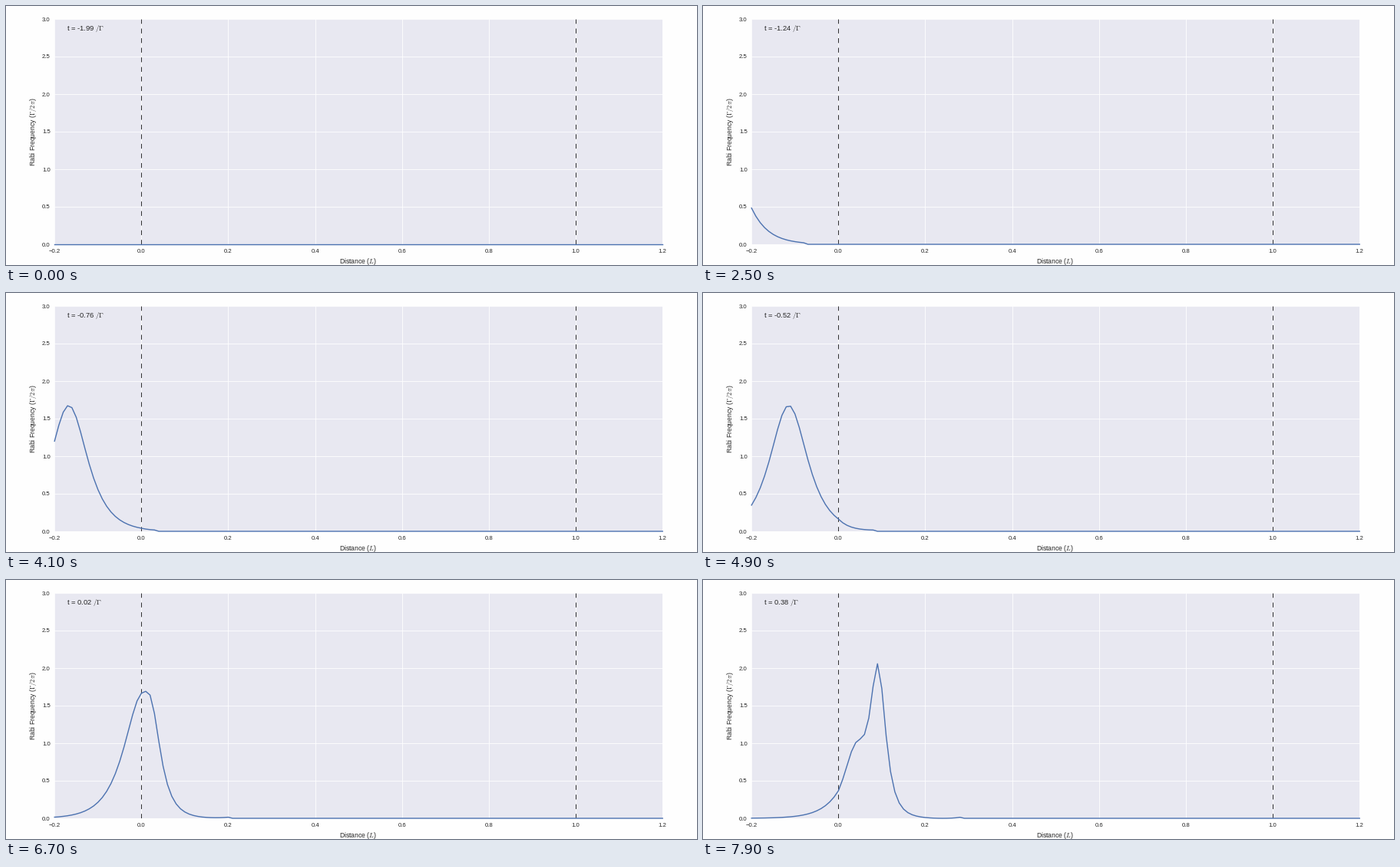
Write a matplotlib script that moves like this. It is 900 by 338 pixels and loops after 8000 ms.

```python
import numpy as np
import matplotlib.pyplot as plt
from matplotlib.animation import FuncAnimation

W, H = 900, 338
FRAMES, INTERVAL = 80, 100
PX = 0.72  # points per pixel at 100 dpi
INK = "#262626"

plt.rcParams.update({
    "font.family": "Liberation Sans",
    "mathtext.fontset": "cm",
    "text.color": INK,
})

# Two-level medium: a 4-pi sech pulse enters at z = 0 and splits up.
SECH_RATE = 2.6339           # unit FWHM
AMPLITUDE = 4 * SECH_RATE / (2 * np.pi)
STRENGTH = 10
TAU = np.linspace(-2, 3, 2001)
X = np.arange(-20, 121) / 100
Z_MAX = 30                   # hundredths of the medium that the pulse reaches


def coherence(rabi):
    """Sine of the pulse area accumulated up to each retarded time."""
    step = TAU[1] - TAU[0]
    area = np.concatenate([[0], np.cumsum((rabi[1:] + rabi[:-1]) / 2) * step])
    return np.sin(2 * np.pi * area)


def propagate(substeps=10):
    """Rabi frequency over retarded time at z = 0, 0.01, 0.02, ..."""
    rabi = AMPLITUDE / np.cosh(SECH_RATE * TAU)
    h = 0.01 / substeps * STRENGTH / 2
    rows = [rabi]
    for _ in range(Z_MAX):
        for _ in range(substeps):
            mid = rabi - h / 2 * coherence(rabi)
            rabi = rabi - h * coherence(mid)
        rows.append(rabi)
    return rows


FIELD = propagate()


def profile(t):
    """Field along x at lab time t; zero ahead of the front."""
    y = np.zeros(len(X))
    for j, x in enumerate(X):
        n = max(j - 20, 0)
        if n <= Z_MAX:
            y[j] = np.interp(2.2 * t - 10 * x, TAU, FIELD[n], left=0)
    return y


fig = plt.figure(figsize=(W / 100, H / 100), dpi=100, facecolor="#fefefe")
left, right, top, bottom = 63.2, 855.2, 17, 311
ax = fig.add_axes([left / W, 1 - bottom / H, (right - left) / W, (bottom - top) / H],
                  facecolor="#e8e8f1")
ax.set(xlim=(-0.2, 1.2), ylim=(0, 3),
       xticks=np.arange(-1, 7) / 5, yticks=np.arange(7) / 2)
ax.spines[:].set_visible(False)
ax.set_axisbelow(True)
ax.grid(color="white", lw=0.8 * PX, ls="-")
ax.tick_params(length=0, labelsize=7.8 * PX, labelcolor=INK)
ax.tick_params(axis="x", pad=6.3 * PX)
ax.tick_params(axis="y", pad=5.5 * PX)

for edge in (0, 1):
    ax.axvline(edge, color="black", lw=0.8 * PX,
               ls=(0, (6 / PX * 0.94, 6 / PX * 0.94)))


def label(x, y, text, size, **kw):
    return fig.text(x / W, 1 - y / H, text, fontsize=size * PX, va="baseline", **kw)


label(459, 336.5, r"Distance ($L$)", 8.6, ha="center")
label(38.5, 164, r"Rabi Frequency ($\Gamma / 2\pi $)", 8.6, ha="center",
      rotation=90, rotation_mode="anchor")
clock = label(79, 31.8, "", 9.4, ha="left")
curve, = ax.plot(X, 0 * X, color="#4c72b0", lw=1.4 * PX, clip_on=False)


def update(i):
    t = -1.99 + 0.03 * i
    curve.set_ydata(profile(t))
    clock.set_text(rf"t = {t:.2f} $/\Gamma$")
    return curve, clock


anim = FuncAnimation(fig, update, frames=FRAMES, interval=INTERVAL,
                     repeat=True, repeat_delay=0, blit=False)
plt.show()
```
